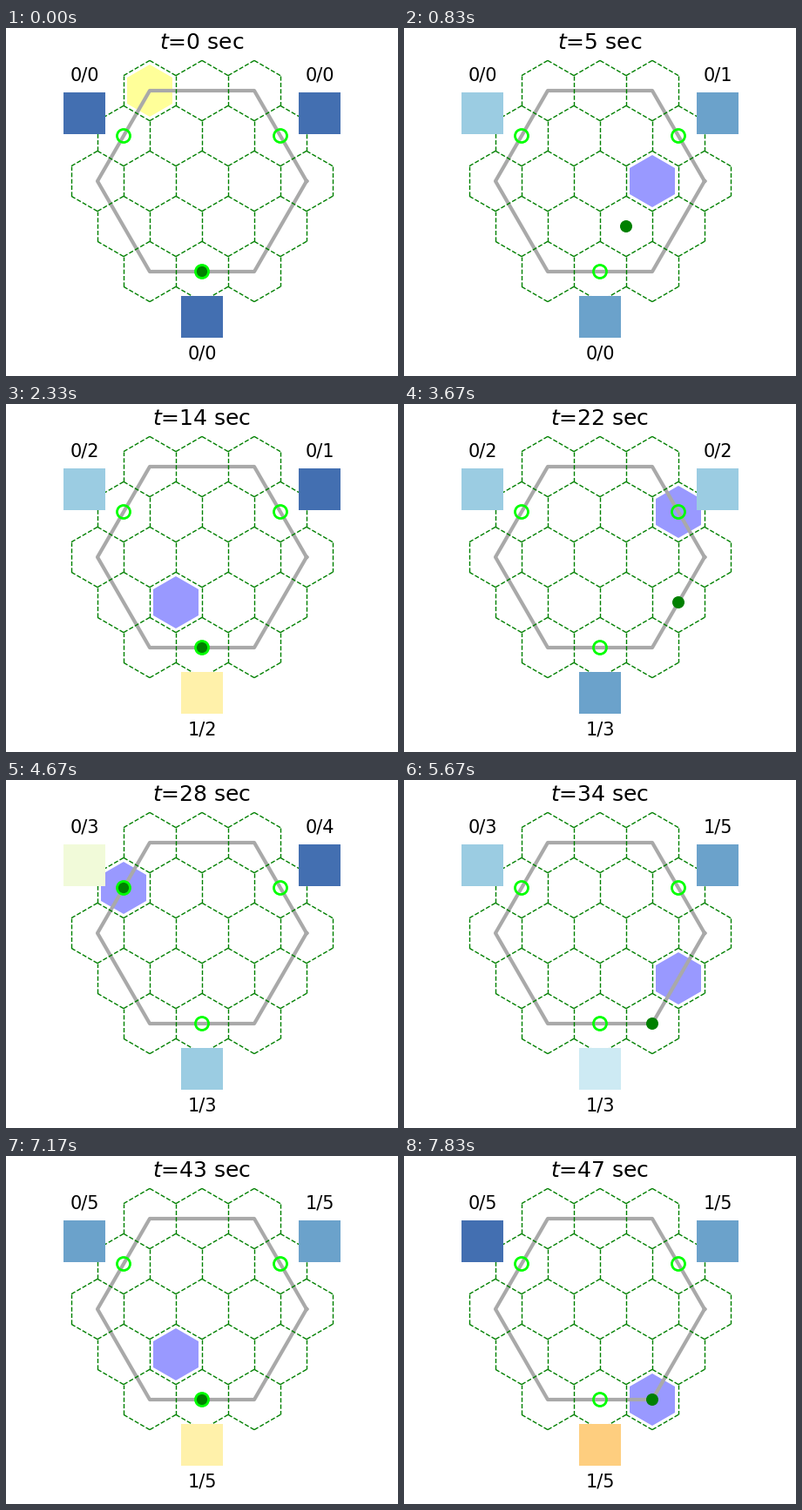
A matplotlib script that plays this animation: 450x400 px, repeating every 8000 ms.

```python
import numpy as np
import matplotlib.pyplot as plt
from matplotlib.animation import FuncAnimation
from matplotlib.collections import LineCollection
from matplotlib.patches import Circle, Polygon, Rectangle

W, H, DPI = 450, 400, 100
SECONDS, SUB, LOOP_MS = 48, 5, 8000
RADIUS = 60 / np.sqrt(3)
CMAP = plt.get_cmap("RdYlBu_r")

# Lattice cells as (half-columns, rows) from the centre.
CELLS = {"L": (-3, -1), "R": (3, -1), "B": (0, 2),
         "e": (4, 0), "s": (3, 1), "n": (-2, -2), "q": (2, 2)}
# Stops in order; a digit is the number of seconds to wait there.
ROUTE = "R B L2 B3 R s R1 L R e B L n L B q"

KEYS = (0, 5, 14, 22, 28, 39, 47)
# Box: centre, label baseline, levels at KEYS, rewarded try.
BOXES = {"L": ((90, 98), 61, (1, 3, 3, 3, 5, 2, 1), None),
         "R": ((360, 98), 61, (1, 2, 1, 3, 1, 3, 2), 5),
         "B": ((225, 332), 381, (1, 2, 6, 2, 3, 4, 7), 2)}


def to_px(cell):
    return np.array([225 + 30 * cell[0], 176 + 52 * cell[1]])


def hexagon(center, radius):
    a = np.radians(np.arange(6) * 60 + 30)
    return center + radius * np.column_stack([np.cos(a), np.sin(a)])


def step(cell, goal):
    """One hop toward goal: diagonal while rows differ, then sideways."""
    du, dv = np.subtract(goal, cell)
    if dv == 0:
        return cell[0] + 2 * np.sign(du), cell[1]
    return cell[0] + (1 if du >= 0 else -1), cell[1] + np.sign(dv)


def walk():
    """Cell of the agent and running tries per box, second by second."""
    path, tries = [CELLS["B"]], {name: [] for name in BOXES}
    for stop in ROUTE.split():
        name, wait = stop[0], int(stop[1:] or 0)
        while tuple(path[-1]) != CELLS[name]:
            path.append(step(path[-1], CELLS[name]))
        if name in BOXES:
            arrival = len(path) - 1
            tries[name] += [arrival + k for k in range(min(wait, 1) + 1)]
        path += [path[-1]] * wait
    path += [path[-1]] * (SECONDS - len(path))
    return path, tries


def grid_edges():
    edges = {}
    for v in range(-2, 3):
        span = 4 - abs(v)
        for u in range(-span, span + 1, 2):
            pts = hexagon(to_px((u, v)), RADIUS)
            for p, q in zip(pts, np.roll(pts, -1, axis=0)):
                edges.setdefault(tuple(np.round((p + q) / 2).astype(int)), (p, q))
    return list(edges.values())


def lag(t):
    """Seconds by which the glowing cell trails the agent."""
    return int(round(np.interp(t, (0, 22, 28, 39, 47), (0.5, 2, 0, 2, 0))))


PATH, TRIES = walk()

plt.rcParams["font.family"] = "DejaVu Sans"
fig = plt.figure(figsize=(W / DPI, H / DPI), dpi=DPI, facecolor="white")
ax = fig.add_axes([0, 0, 1, 1])
ax.set_xlim(0, W)
ax.set_ylim(H, 0)
ax.axis("off")

glow = ax.add_patch(Polygon(hexagon(to_px((0, 0)), 30), lw=0, zorder=1))
turn = np.radians(np.arange(7) * 60)
ax.plot(225 + 120 * np.cos(turn), 176 + 208 / np.sqrt(3) * np.sin(turn),
        color="darkgray", lw=3, zorder=2)
ax.add_collection(LineCollection(grid_edges(), colors="green", linewidths=1,
                                 linestyles="dashed", zorder=3))
dot = ax.add_patch(Circle((0, 0), 7, fc="green", lw=0, zorder=5))

squares, labels = {}, {}
for name, ((x, y), base, *_) in BOXES.items():
    ax.add_patch(Circle(to_px(CELLS[name]), 7.5, fill=False, ec="lime", lw=2, zorder=6))
    squares[name] = ax.add_patch(Rectangle((x - 24, y - 24), 48, 48, lw=0, zorder=4))
    labels[name] = ax.text(x, base, "", fontsize=15, ha="center")
title = ax.text(225, 24, "", fontsize=18, ha="center")


def draw(frame):
    # Seconds turn over one sub-frame early, so rounding never delays them.
    t = min((frame + 1) // SUB, SECONDS - 1)
    title.set_text(f"$t$={t} sec")
    dot.center = to_px(PATH[t])
    spot = PATH[max(t - lag(t), 0)] if t else CELLS["n"]
    glow.set_xy(hexagon(to_px(spot), 30))
    glow.set_facecolor("#9999ff" if t else "#ffff99")
    for name, (_, _, levels, lucky) in BOXES.items():
        count = sum(s <= t for s in TRIES[name])
        wins = int(lucky is not None and count >= lucky)
        labels[name].set_text(f"{wins}/{count}")
        squares[name].set_facecolor(CMAP(round(np.interp(t, KEYS, levels)) / 11))
    return [title, dot, glow, *squares.values(), *labels.values()]


anim = FuncAnimation(fig, draw, frames=SECONDS * SUB,
                     interval=LOOP_MS / (SECONDS * SUB), repeat=True, blit=False)
plt.show()
```
